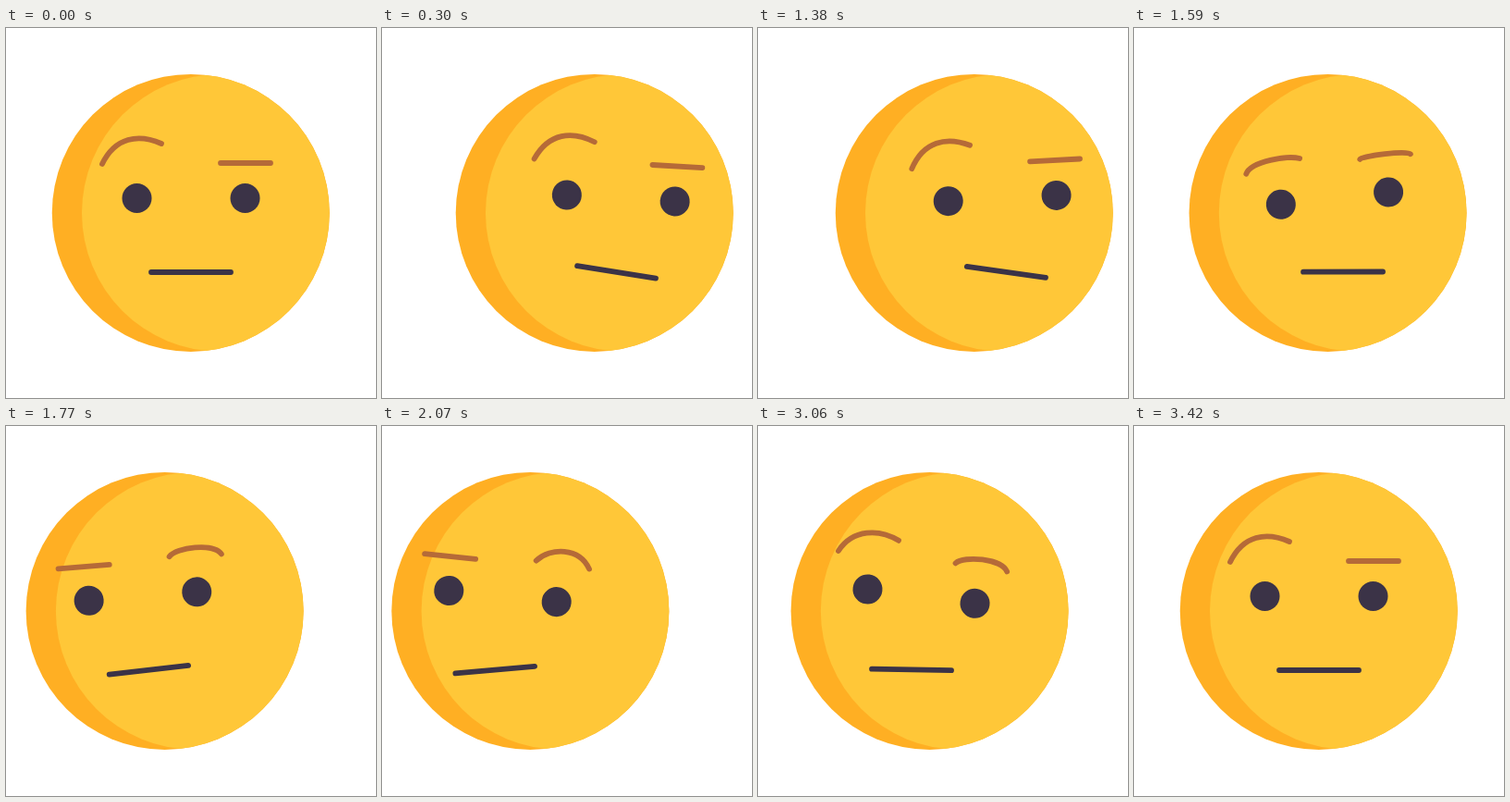
Animation, 400 px wide and 400 px high, one loop 5630 ms. Source, as an HTML page with a canvas:

```html
<!DOCTYPE html>
<html lang="en">
<head>
<meta charset="utf-8">
<title>Skeptical face</title>
<style>
  html, body { margin: 0; width: 100%; height: 100%; overflow: hidden; background: #fff; }
  canvas { display: block; width: 400px; height: 400px; }
</style>
</head>
<body>
<canvas id="stage" width="400" height="400"></canvas>
<script>
const ctx = document.getElementById('stage').getContext('2d');
const LOOP = 5630, STEP = 30;
const SKIN = '#ffc738', SHADE = '#ffaf23', DARK = '#3b3347', BROW = '#b56a38';
const REST_TILT = -3.05, LEAN = 4.5, MOUTH_TILT = 11;

// The head looks right, then left, then back to the middle.
const moves = [
  { at: 0, rise: 450, from: 0, to: 1 },
  { at: 1390, rise: 525, from: 1, to: -1 },
  { at: 2780, rise: 490, from: -1, to: 0 },
];

const rad = deg => deg * Math.PI / 180;
const mix = (a, b, k) => a + (b - a) * k;

// Eased progress of u from a to b, held at 0 and 1 outside.
function ease(u, a, b) {
  const k = Math.min(1, Math.max(0, (u - a) / (b - a)));
  return k * k * (3 - 2 * k);
}

function poseAt(t) {
  const { at, rise, from, to } = moves.findLast(m => m.at <= t);
  const u = (t - at) / rise;

  // Swing past the goal, then settle on it.
  const turn = mix(mix(from, to * 1.19, ease(u, 0, 1)), to, ease(u, 1, 1.59));

  // Lean into the travel, tip over the other way, then relax.
  const rest = to * REST_TILT;
  const lean = from * REST_TILT + Math.sign(to - from) * LEAN;
  let tilt = mix(from * REST_TILT, lean, ease(u, 0, 0.55));
  tilt = mix(tilt, rest * 2.1, ease(u, 0.55, 1.14));
  tilt = mix(tilt, rest, ease(u, 1.14, 1.8));

  const slow = ease(u, 0, 1.3), quick = ease(u, 0, 0.72);
  const wasLeft = from < 0 ? 1 : 0, isLeft = to < 0 ? 1 : 0;
  return {
    turn, tilt,
    mouth: MOUTH_TILT * mix(from, to, slow),
    leftArch: 1 - mix(wasLeft, isLeft, quick),
    rightArch: mix(wasLeft, isLeft, slow),
  };
}

function disc(x, y, r, color) {
  ctx.fillStyle = color;
  ctx.beginPath();
  ctx.arc(x, y, r, 0, 2 * Math.PI);
  ctx.fill();
}

// A flat brow from x0 to x1 at height y, bent towards a Bezier arc.
function brow(x0, x1, y, arc, bend) {
  const flat = [x0, y, x0, y, x1, y, x1, y];
  const p = arc.map((v, i) => mix(flat[i], v, bend));
  ctx.strokeStyle = BROW;
  ctx.beginPath();
  ctx.moveTo(p[0], p[1]);
  ctx.bezierCurveTo(...p.slice(2));
  ctx.stroke();
}

function drawHead(x) {
  ctx.save();
  ctx.translate(x, 0);
  disc(199.75, 199.9, 150, SHADE);
  ctx.clip();
  disc(232, 199.9, 150, SKIN);
  ctx.restore();
}

function drawFace(x, pose) {
  ctx.save();
  ctx.translate(200 + x, 200);
  ctx.rotate(rad(pose.tilt));
  ctx.translate(-200, -200);

  disc(141.5, 184, 16, DARK);
  disc(258.5, 184, 16, DARK);
  brow(111.3, 166.7, 147, [104, 147, 118, 118, 143, 114, 168, 125], pose.leftArch);
  brow(232, 286, 146, [232, 142, 246, 126, 277, 122.5, 290, 145], pose.rightArch);

  ctx.translate(200, 264);
  ctx.rotate(rad(pose.mouth));
  ctx.strokeStyle = DARK;
  ctx.beginPath();
  ctx.moveTo(-43, 0);
  ctx.lineTo(43, 0);
  ctx.stroke();
  ctx.restore();
}

function draw(t) {
  const pose = poseAt(t);
  ctx.fillStyle = '#fff';
  ctx.fillRect(0, 0, 400, 400);
  ctx.lineWidth = 5.8;
  ctx.lineCap = 'round';
  drawHead(pose.turn * 35 - Math.abs(pose.turn));
  drawFace(pose.turn * 65, pose);
}

const start = performance.now();
function tick() {
  const t = Math.max(0, performance.now() - start) % LOOP;
  draw(Math.floor(t / STEP) * STEP);
  requestAnimationFrame(tick);
}
tick();
</script>
</body>
</html>
```
